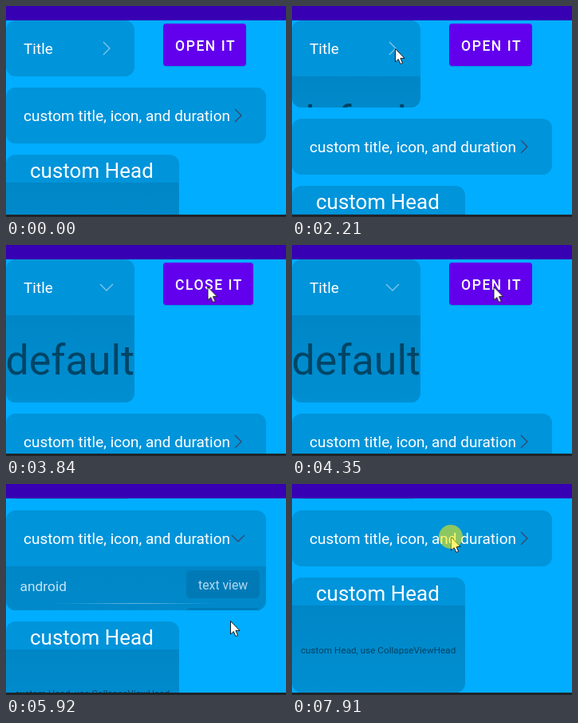
Animation, 351 px wide and 264 px high, one loop 8000 ms. Source, as an HTML page:

```html
<!DOCTYPE html>
<html lang="en">
<head>
<meta charset="utf-8">
<title>Collapse view</title>
<style>
  html, body { margin: 0; width: 100%; height: 100%; overflow: hidden; }
  body { font-family: Roboto, sans-serif; background: #00adff; }

  .stage { position: relative; width: 351px; height: 264px; overflow: hidden; background: #00adff; }
  .bar { position: absolute; left: 0; right: 0; top: 0; height: 18px; background: #3700b3; }
  .nav { position: absolute; left: 0; right: 0; bottom: 0; height: 3px; background: #202428; }

  /* every moving part shares one 8 s clock */
  .page, .body, .chev, .btn, .cursor, .press {
    animation: 8s cubic-bezier(.37, 0, .63, 1) infinite;
  }

  .page { position: absolute; left: 0; top: 18px; width: 351px; animation-name: scroll; }
  .card { position: relative; margin-bottom: 14px; border-radius: 12px; overflow: hidden; background: #0094da; }
  .head { position: relative; height: 70px; }
  .body { position: relative; overflow: hidden; }
  .fill { position: relative; background: linear-gradient(#0086c6, #008fd2); }

  /* zero line height: top is the vertical middle of the text */
  .t { position: absolute; line-height: 0; white-space: nowrap; }
  .title { left: 22px; top: 36px; font-size: 19px; color: #fff; }

  .one { width: 161px; }
  .two { width: 326px; }
  .three { width: 217px; }
  .one .body { animation-name: open-one; }
  .two .body { animation-name: open-two; }
  .one .fill, .three .fill { height: 109px; }
  .two .fill { height: 141px; }
  .three .head { height: 35px; }

  .big { left: -.5px; top: 57px; font-size: 52px; color: rgba(0, 0, 0, .5); }
  .three .title { left: 30px; top: 20px; font-size: 26px; }
  .note { left: 11px; top: 55.5px; font-size: 11.7px; color: rgba(0, 0, 0, .52); }

  .chev { position: absolute; width: 20px; height: 20px; top: 25px; fill: none; stroke-width: 1.3; }
  .one .chev { left: 116px; stroke: #82c7ea; animation-name: turn-one; }
  .two .chev { left: 281px; stroke: #35486c; animation-name: turn-two; }

  .row { position: relative; height: 47px; }
  .row + .row::before {
    content: ""; position: absolute; left: 60px; top: -1px; width: 205px; height: 1px;
    background: linear-gradient(90deg, transparent, rgba(255, 255, 255, .38), transparent);
  }
  .label { left: 17.5px; top: 24.5px; font-size: 17.4px; color: #c3e4f5; }
  .chip { position: absolute; left: 226px; top: 5px; width: 92px; height: 35px; border-radius: 5px; background: #007ab7; }
  .chip .t { left: 15px; top: 19px; font-size: 15.8px; color: #b0daef; }

  .btn {
    position: absolute; left: 197px; top: 4px; height: 53px; border-radius: 4px;
    background: #6200ee; box-shadow: 0 1px 1px rgba(0, 0, 0, .15);
    animation-timing-function: step-end;
  }
  .btn .t { left: 15px; top: 27.5px; font-size: 17.5px; font-weight: 500; letter-spacing: 1.56px; color: #fff; }
  .open { width: 104px; animation-name: show-open; }
  .close { width: 113px; animation-name: show-close; }

  .cursor { position: absolute; left: 0; top: 0; animation-name: move; }
  .cursor svg { position: absolute; left: 0; top: 0; overflow: visible; }
  .press {
    position: absolute; left: -15px; top: -15px; width: 30px; height: 30px; border-radius: 50%;
    background: rgba(255, 240, 0, .55); animation-name: press; animation-timing-function: step-end;
  }

  @keyframes scroll {
    0%, 61.25% { transform: none; }
    65.6%, 100% { transform: translateY(-69px); }
  }
  @keyframes open-one {
    0%, 17.5% { height: 0; }
    20.625%, 25.8% { height: 109px; }
    28.925%, 37.375% { height: 0; }
    40.5%, 54.4% { height: 109px; }
    57.525%, 100% { height: 0; }
  }
  @keyframes turn-one {
    0%, 17.5% { transform: none; }
    19.06%, 25.8% { transform: rotate(90deg); }
    27.36%, 37.375% { transform: none; }
    38.94%, 54.4% { transform: rotate(90deg); }
    55.96%, 100% { transform: none; }
  }
  @keyframes open-two {
    0%, 70.25% { height: 0; }
    79%, 86.8% { height: 141px; }
    95.55%, 100% { height: 0; }
  }
  @keyframes turn-two {
    0%, 70.25% { transform: none; }
    74.2%, 86.8% { transform: rotate(90deg); }
    91.2%, 100% { transform: none; }
  }
  @keyframes show-open {
    0% { visibility: visible; }
    37.25% { visibility: hidden; }
    54.1%, 100% { visibility: visible; }
  }
  @keyframes show-close {
    0% { visibility: hidden; }
    37.25% { visibility: visible; }
    54.1%, 100% { visibility: hidden; }
  }
  @keyframes move {
    0% { transform: translate(328px, 211px); opacity: 0; animation-timing-function: step-end; }
    2.5% { transform: translate(328px, 211px); opacity: 1; }
    4.1% { transform: translate(326px, 154px); animation-timing-function: ease-out; }
    6.1%, 8.1% { transform: translate(313px, 86px); }
    14.75%, 29.2% { transform: translate(129px, 53px); }
    33%, 57.5% { transform: translate(252.5px, 52px); }
    60.6%, 61.25% { transform: translate(333px, 190px); }
    65% { transform: translate(333px, 121px); }
    66.4%, 67% { transform: translate(311px, 108px); }
    68.6%, 70.4% { transform: translate(290px, 74px); }
    73.6%, 81% { transform: translate(281px, 171px); }
    85.4%, 87% { transform: translate(297px, 64px); }
    89%, 91% { transform: translate(296px, 94px); }
    98.2%, 100% { transform: translate(199px, 66px); opacity: 1; }
  }
  @keyframes press {
    0% { opacity: 0; }
    16% { opacity: 1; }
    17.5% { opacity: 0; }
    24% { opacity: 1; }
    25.6% { opacity: 0; }
    35.6% { opacity: 1; }
    37.25% { opacity: 0; }
    52.4% { opacity: 1; }
    54% { opacity: 0; }
    61% { opacity: 1; }
    65% { opacity: 0; }
    68.75% { opacity: 1; }
    70.1% { opacity: 0; }
    85.6% { opacity: 1; }
    86.8% { opacity: 0; }
    98.8%, 100% { opacity: 1; }
  }
</style>
</head>
<body>
<div class="stage">
  <div class="page">
    <div class="card one">
      <div class="head">
        <span class="t title">Title</span>
        <svg class="chev" viewBox="-10 -10 20 20"><path d="M-4-8 4 0-4 8"/></svg>
      </div>
      <div class="body"><div class="fill"><span class="t big">default</span></div></div>
    </div>

    <div class="card two">
      <div class="head">
        <span class="t title">custom title, icon, and duration</span>
        <svg class="chev" viewBox="-10 -10 20 20"><path d="M-4-8 4 0-4 8"/></svg>
      </div>
      <div class="body">
        <div class="fill">
          <div class="row"><span class="t label">android</span><div class="chip"><span class="t">text view</span></div></div>
          <div class="row"><span class="t label">collapse view</span><div class="chip"><span class="t">text view</span></div></div>
          <div class="row"><div class="chip"><span class="t">text view</span></div></div>
        </div>
      </div>
    </div>

    <div class="card three">
      <div class="head"><span class="t title">custom Head</span></div>
      <div class="fill"><span class="t note">custom Head, use CollapseViewHead</span></div>
    </div>

    <div class="btn open"><span class="t">OPEN IT</span></div>
    <div class="btn close"><span class="t">CLOSE IT</span></div>
  </div>

  <div class="bar"></div>
  <div class="nav"></div>

  <div class="cursor">
    <svg width="13" height="21"><path d="M.5.5V17L4.3 13.5 6.9 19.6 9.6 18.4 7 12.4H12Z" fill="#fff" stroke="#1a1a1a"/></svg>
    <div class="press"></div>
  </div>
</div>
</body>
</html>
```
